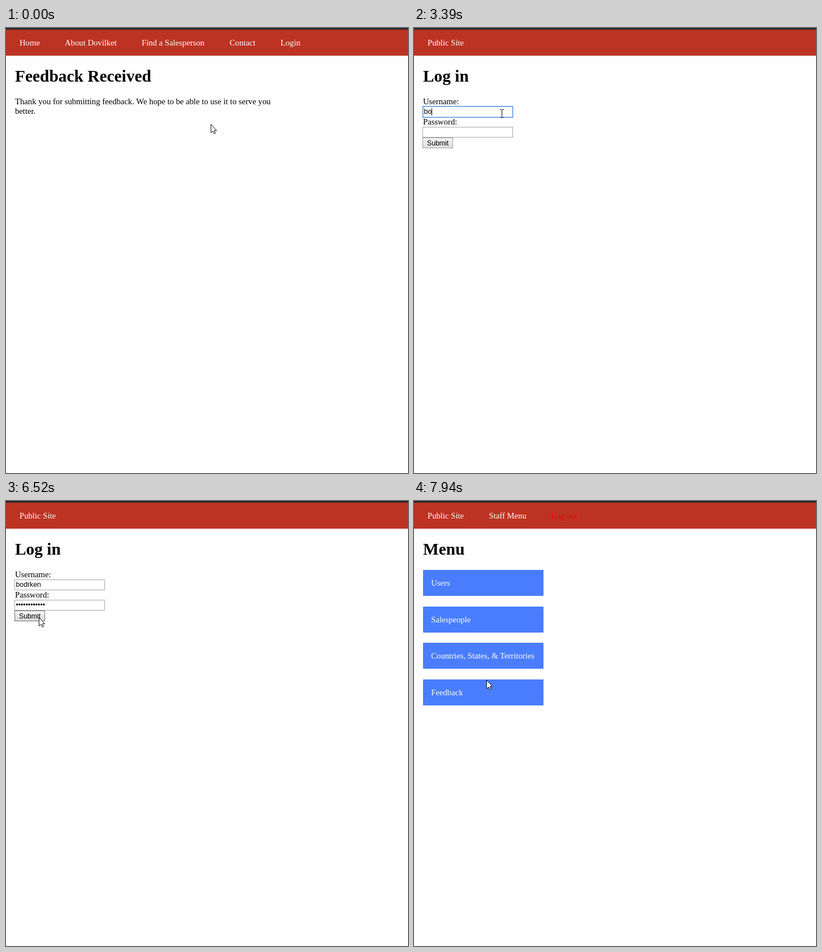
These frames come from a looping animation (711 px wide and 788 px high, 8 s). An HTML page:

```html
<!DOCTYPE html>
<html lang="en">
<head>
<meta charset="utf-8">
<title>Staff login</title>
<style>
  html, body { margin: 0; width: 100%; height: 100%; overflow: hidden; background: #fefefe; }
  svg { display: block; width: 711px; height: 788px; }
  text { font: 14.7px "Liberation Serif", serif; white-space: pre; }
  .title { font-size: 29.4px; font-weight: bold; }
  .nav, .label { fill: #fff; }
  .logout { fill: #f00; }
  .control { font: 12.25px "Liberation Sans", sans-serif; }
  .hint { font: 11.2px "Noto Sans", sans-serif; fill: #333; }
  rect { shape-rendering: crispEdges; }
  .field { fill: #fff; stroke: #a6a6a6; }
  .focused { stroke: #5a94e6; stroke-width: 1.6; shape-rendering: auto; }
  .tile { fill: #4a7dfd; }
  .tile.hover { fill: #3f70e0; }
  .button { fill: url(#face); stroke: #a3a3a3; }
  .button.hover { stroke: #7c7c7c; }
  .button.pressed { fill: url(#pressedFace); stroke: #777; }
  .list { fill: #fff; filter: drop-shadow(0 1px 1.5px rgba(0, 0, 0, .4)); }
  .pointer { fill: #fff; stroke: #111; stroke-width: 1; stroke-linejoin: round; }
</style>
</head>
<body>
<svg viewBox="0 0 711 788">
  <defs>
    <linearGradient id="face" x2="0" y2="1"><stop stop-color="#f6f6f6"/><stop offset="1" stop-color="#dcdcdc"/></linearGradient>
    <linearGradient id="pressedFace" x2="0" y2="1"><stop stop-color="#f8f8f8"/><stop offset="1" stop-color="#d6d6d6"/></linearGradient>
  </defs>
  <rect width="711" height="788" fill="#fefefe"/>
  <rect width="711" height="3" fill="#2b2a2a"/>
  <rect y="3" width="711" height="46" fill="#bc3323"/>
  <g id="thanks"></g>
  <g id="login"></g>
  <g id="menu"></g>
  <g id="arrow" class="pointer"><path d="M.5 .5v15l3.5-3.2 2.2 5 2.2-1-2.1-4.8H10.5z"/></g>
  <g id="hand" class="pointer">
    <path d="M5 13V2a1.6 1.6 0 0 1 3.2 0v6c.3-1.3 2.6-1.2 2.8.5.4-1 2.3-.8 2.4.7.5-.8 2-.5 2 .9V15c0 2.5-1.6 3.5-1.6 6.5H6.5c0-2-2.5-4-5.5-8.2-1.3-2 .9-3.2 2.3-1.8z"/>
    <path d="M8.2 8v3M11 8.5v3M13.4 9.2v3"/>
  </g>
  <g id="beam" class="pointer"><path d="M0 .5h3M4 .5h3M3.5 1v13M0 14.5h3M4 14.5h3"/></g>
</svg>
<script>
const LOOP = 8000;
const $ = id => document.getElementById(id);
const show = (id, on) => $(id).style.display = on ? '' : 'none';
const text = (x, y, value, kind = '', id = '') =>
  `<text id="${id}" class="${kind}" x="${x}" y="${y}">${value}</text>`;
const box = (x, y, w, h, kind, id) =>
  `<rect id="${id}" class="${kind}" x="${x}" y="${y}" width="${w}" height="${h}"/>`;
const nav = items => items.map(([x, name, kind = '']) => text(x, 31, name, 'nav ' + kind)).join('');

$('thanks').innerHTML =
  nav([[24, 'Home'], [104, 'About Dovilket'], [240, 'Find a Salesperson'], [395.5, 'Contact'], [485.5, 'Login']]) +
  text(16, 95, 'Feedback Received', 'title') +
  text(16, 135, 'Thank you for submitting feedback. We hope to be able to use it to serve you') +
  text(16, 152, 'better.');

const field = (name, y) =>
  box(15.5, y + .5, 159, 18, 'field', name) +
  box(15.8, y - .2, 158.8, 19.4, 'field focused', name + 'Focus') +
  text(17.5, y + 13, '', 'control', name + 'Text') +
  box(17, y + 3, 1, 13, '', name + 'Caret');

const hints = ['hkt472', 'klomut', 'Bramholowe@nudvo.test', 'zeltpavn@nudvo.test', 'Rubona@nudvo.test', 'tulvafe'];
$('login').innerHTML =
  nav([[24, 'Public Site']]) +
  text(16, 95, 'Log in', 'title') +
  text(16, 135, 'Username:') + field('user', 139) +
  text(16, 171, 'Password:') + field('pass', 175) +
  box(15.5, 194.5, 53, 18, 'button', 'submit') + text(23, 208, 'Submit', 'control') +
  `<g id="hints"><rect class="list" x="15" y="159" width="177" height="214" rx="2"/>` +
  hints.map((name, i) => text(27, 187 + 33 * i, name, 'hint')).join('') + '</g>';

const tiles = ['Users', 'Salespeople', 'Countries, States, &amp; Territories', 'Feedback'];
$('menu').innerHTML =
  nav([[24, 'Public Site'], [132.5, 'Staff Menu'], [242.5, 'Log out', 'logout']]) +
  text(16, 95, 'Menu', 'title') +
  tiles.map((name, i) => {
    const y = Math.round(122.4 + 64.4 * i);
    return box(16, y, 213, 46, 'tile', 'tile' + i) + text(30.3, y + 28, name, 'label');
  }).join('');

// Each row: start time in ms, then the values held until the next row.
const pages = [[0, 'thanks'], [960, 'login'], [6920, 'menu']];
const pointers = [
  [0, 'arrow', 362, 170], [150, 'arrow', 378, 160], [300, 'arrow', 448, 108],
  [420, 'arrow', 531, 52], [540, 'arrow', 497, 33], [690, 'arrow', 497, 31],
  [840, 'hand', 492, 31], [1080, 'arrow', 263, 157], [1230, 'arrow', 240, 152],
  [1350, 'arrow', 215, 147], [1470, 'arrow', 196, 144], [1590, 'arrow', 182, 142],
  [1710, 'beam', 170, 144], [1990, 'beam', 154, 144], [2130, 'beam', 152, 144],
  [5890, 'arrow', 128, 166], [6010, 'beam', 100, 178], [6130, 'arrow', 74, 198],
  [6280, 'arrow', 62, 204], [6400, 'arrow', 58, 206], [7510, 'hand', 53, 209],
  [7660, 'hand', 103, 286], [7940, 'arrow', 128, 317]
];
const typed = [[0, 0], [2990, 1], [3390, 2], [3670, 3], [3790, 4], [3940, 5], [4090, 7]];
const dots = [[0, 0], [5520, 12]];
const focus = [[0, ''], [2440, 'user'], [4370, 'pass'], [6520, '']];
const caret = [[0, 1], [2870, 0], [2990, 1], [4940, 0], [5370, 1], [6010, 0]];
const listAlpha = [[0, 0], [2440, 1], [2990, .4], [3110, 0]];
const press = [[0, ''], [6280, 'hover'], [6520, 'pressed']];
const hovered = [[0, -1], [7510, 1], [7660, 2], [7940, -1]];

const at = (rows, t) => rows.findLast(row => row[0] <= t).slice(1);

function drawField(name, value, t) {
  const active = at(focus, t)[0] === name;
  const label = $(name + 'Text');
  label.textContent = value;
  show(name + 'Focus', active);
  show(name + 'Caret', active && at(caret, t)[0]);
  $(name + 'Caret').setAttribute('x', 17 + Math.round(value ? label.getComputedTextLength() : 0));
}

function draw(t) {
  const [page] = at(pages, t);
  for (const id of ['thanks', 'login', 'menu']) show(id, id === page);
  const [shape, x, y] = at(pointers, t);
  for (const id of ['arrow', 'hand', 'beam']) show(id, id === shape);
  $(shape).setAttribute('transform', `translate(${x} ${y})`);
  if (page === 'login') {
    drawField('user', 'bodrken'.slice(0, at(typed, t)[0]), t);
    drawField('pass', '•'.repeat(at(dots, t)[0]), t);
    $('hints').style.opacity = at(listAlpha, t)[0];
    $('submit').setAttribute('class', 'button ' + at(press, t)[0]);
  }
  tiles.forEach((_, i) => $('tile' + i).classList.toggle('hover', at(hovered, t)[0] === i));
}

const start = performance.now();
function tick() {
  draw((performance.now() - start) % LOOP);
  requestAnimationFrame(tick);
}
tick();
</script>
</body>
</html>
```
